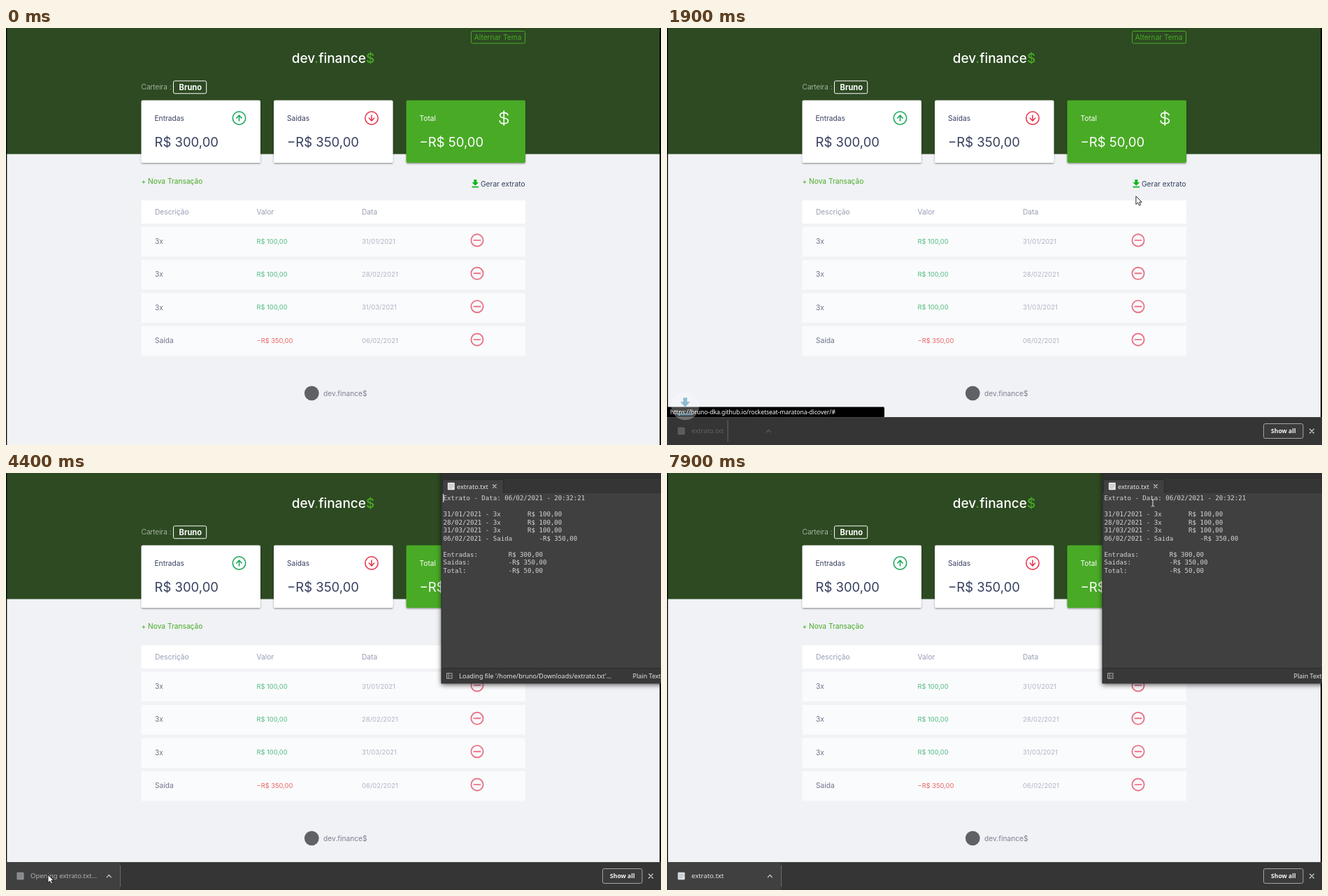
An HTML page for the animation above (8 s loop, 937 by 597 pixels).

```html
<!DOCTYPE html>
<html lang="pt-BR">
<head>
<meta charset="utf-8">
<title>Finance dashboard</title>
<style>
html, body { margin: 0; width: 100%; height: 100%; overflow: hidden; background: #f0f2f5; }
svg { display: block; width: 937px; height: 597px; }
text { font: 10.2px Inter, sans-serif; fill: #363f5f; white-space: pre; }
.big { font-size: 18.5px; }
.num { font-size: 9.3px; }
.date { font-size: 9.5px; }
.ui { font-family: "Noto Sans", sans-serif; fill: #e6e6e6; }
.mono { font: 9.1px "DejaVu Sans Mono", monospace; fill: #d6d6d6; }
.line { fill: none; stroke-linecap: round; stroke-linejoin: round; }
</style>
</head>
<body>
<svg id="stage" viewBox="0 0 937 597"></svg>
<script>
const LOOP = 8000, STEP = 100;
const USER = 'bruno';
const stage = document.getElementById('stage');

const text = (x, y, str, fill = '', cls = '', css = '', id = '') =>
  `<text ${id && `id="${id}"`} x="${x}" y="${y}" class="${cls}" style="${fill && `fill:${fill};`}${css}">${str}</text>`;
const rect = (x, y, w, h, fill, more = '') =>
  `<rect x="${x}" y="${y}" width="${w}" height="${h}" fill="${fill}" ${more}/>`;
const line = (d, color, width = 1, more = '') =>
  `<path class="line" d="${d}" stroke="${color}" stroke-width="${width}" ${more}/>`;
const ring = (x, y, r, color, width) =>
  `<circle cx="${x}" cy="${y}" r="${r}" fill="none" stroke="${color}" stroke-width="${width}"/>`;
const group = (id, body, more = '') => `<g id="${id}" ${more}>${body}</g>`;

function card(x, label, value, fill, ink, icon) {
  return rect(x, 103.6, 170.5, 89.4, fill, 'rx="2" filter="url(#soft)"') +
    text(x + 19, 132.7, label, ink) + text(x + 19, 170, value, ink, 'big') + icon;
}

function arrowIcon(x, dir, color) {
  return ring(x, 129, 9.2, color, 1.5) +
    line(`M${x} ${129 + 4 * dir}V${129 - 4 * dir}M${x - 3.7} 129L${x} ${129 - 4 * dir}L${x + 3.7} 129`, color, 1.5);
}

function row(i, [name, value, date]) {
  const y = 284.7 + i * 47.4;
  const ink = value[0] === '−' ? '#e92929' : '#12a454';
  return group('row' + i,
    rect(193.5, y, 549.5, 42.6, '#fff') +
    text(213, y + 24.1, name) +
    text(358.5, y + 23.9, value, ink, 'num') +
    text(509, y + 23.9, date, '#969cb3', 'date') +
    ring(674, y + 19.2, 8.6, '#e83f5b', 1.9) +
    line(`M669.5 ${y + 19.2}h9`, '#e83f5b', 1.9), 'opacity=".7"');
}

function page() {
  const dollar = line('M712.3 118.8V139.2M718 124.6C717.6 122.4 715.4 121.4 712.3 121.4C709 121.4 706.7 122.8 706.7 125.1' +
    'C706.7 131 718.4 127 718.4 132.8C718.4 135.5 715.8 136.8 712.3 136.8C709 136.8 706.6 135.4 706.2 132.8', '#fff', 1.6);
  const rows = [
    ['3x', 'R$ 100,00', '31/01/2021'],
    ['3x', 'R$ 100,00', '28/02/2021'],
    ['3x', 'R$ 100,00', '31/03/2021'],
    ['Saída', '−R$ 350,00', '06/02/2021']
  ];
  return rect(0, 0, 937, 597, '#f0f2f5') + rect(0, 0, 937, 180.5, '#2d4a22') +
    rect(665.5, 4.5, 77, 17.5, 'none', 'rx="2" stroke="#49aa26"') +
    text(669.8, 17, 'Alternar Tema', '#49aa26') +
    text(408.7, 50.3, 'dev<tspan fill="#49aa26">.</tspan>finance<tspan fill="#49aa26">$</tspan>', '#fff', '', 'font-size:19px;font-weight:500') +
    text(193.5, 88.3, 'Carteira :', '#c3ccc0', '', 'font-weight:300') +
    rect(239.5, 75.8, 47.2, 18, 'none', 'rx="2" stroke="#fff"') +
    text(247.6, 88.8, 'Bruno', '#fff', '', 'font-size:11.1px;font-weight:700') +
    card(193.5, 'Entradas', 'R$ 300,00', '#fff', '#363f5f', arrowIcon(333.5, 1, '#12a454')) +
    card(383, 'Saídas', '−R$ 350,00', '#fff', '#363f5f', arrowIcon(523, -1, '#e92f48')) +
    card(572.5, 'Total', '−R$ 50,00', '#49aa26', '#fff', dollar) +
    text(193.5, 222.6, '+ Nova Transação', '#49aa26') +
    '<path id="get" d="M669.3 217h4v4h2.8l-4.8 4.7l-4.8-4.7h2.8zM666.5 226.7h9.6v1.7h-9.6z"/>' +
    text(679, 226.8, 'Gerar extrato', '', '', '', 'link') +
    rect(193.5, 246.7, 549.5, 33.3, '#fff') +
    text(213, 266.6, 'Descrição', '#969cb3') + text(358.5, 266.6, 'Valor', '#969cb3') + text(509, 266.6, 'Data', '#969cb3') +
    rows.map((r, i) => row(i, r)).join('') +
    '<circle cx="437.3" cy="522.8" r="10.4" fill="#5f6166"/>' +
    text(454, 526.6, 'dev.finance$', '#7d8191') +
    rect(0, 0, 1.3, 597, '#000') + rect(935, 0, 2, 597, '#000');
}

const docIcon = (x, y, fill) => rect(x, y, 10, 10.5, fill, 'rx="1"') +
  line(`M${x + 2} ${y + 3}h6m-6 2.3h6m-6 2.3h4`, '#9aa0a6', .7);

function shelf() {
  const item = rect(1, 557.5, 162, 39.5, '#404040', 'id="lit"') +
    group('doc', docIcon(15.5, 571.8, '#dfe3e8')) +
    text(35, 580.3, '', '', 'ui', 'font-size:9.5px', 'file') +
    group('caret', line('M142.2 578.8l3.1-3.3l3.1 3.3', '#ccc', 1.2));
  return group('status', rect(0, 542.6, 311, 14.6, '#000', 'rx="1.5"') +
      text(4.8, 552.9, `https://${USER}-dka.github.io/rocketseat-maratona-dicover/#`, '#fff', 'ui', 'font-size:8.5px', 'url')) +
    group('bar', rect(0, 557, 937, 40, '#353535') + rect(0, 557, 937, 1, '#434343')) +
    group('item', item) +
    group('sep', line('M0 562V592', '#6a6a6a')) +
    group('all', rect(853.5, 566.5, 56.5, 21, '#3b3b3b', 'rx="2.5" stroke="#a5a5a5"') +
      text(864, 580.4, 'Show all', '#f4f4f4', 'ui', 'font-size:8.6px;font-weight:700')) +
    group('close', line('M919.5 574.2l5.8 5.8m0-5.8l-5.8 5.8', '#ddd', 1.2)) +
    group('drop', '<circle r="20" fill="#fff" opacity=".35"/>' +
      '<path d="M-2.8-12h5.6v6h4.2l-7 7.5l-7-7.5h4.2zM-10.5 10.6h21v2.4h-21z" fill="#7fb2d0"/>');
}

function editor() {
  const pad = (a, col, b) => a.padEnd(col) + b;
  const lines = [
    'Extrato - Data: 06/02/2021 - 20:32:21', '',
    pad('31/01/2021 - 3x', 22, 'R$ 100,00'),
    pad('28/02/2021 - 3x', 22, 'R$ 100,00'),
    pad('31/03/2021 - 3x', 22, 'R$ 100,00'),
    pad('06/02/2021 - Saida', 25, '-R$ 350,00'), '',
    pad('Entradas:', 17, 'R$ 300,00'),
    pad('Saídas:', 17, '-R$ 350,00'),
    pad('Total:', 17, '-R$ 50,00')
  ];
  return rect(622.5, -8, 330, 309.5, '#2b2b2b', 'filter="url(#deep)"') +
    rect(623.5, 0, 314, 7.5, '#303030') + rect(623.5, 8, 314, 21, '#353535') +
    rect(624.5, 9, 87.5, 21, '#404040') +
    line('M624.5 29V9.5H711.8V29', '#292929') +
    rect(623.5, 29, 314, 250, '#404040') +
    rect(623.5, 279, 314, 22, '#383838') + rect(623.5, 279, 314, 1, '#2b2b2b') +
    docIcon(631.8, 13.8, '#e6e6e6') +
    text(645, 22.6, 'extrato.txt', '', 'ui', 'font-size:9.2px') +
    line('M696.6 16.8l4.6 4.6m0-4.6l-4.6 4.6', '#c4c4c4', 1.3) +
    lines.map((s, i) => text(625.6, 39 + i * 11.52, s, '', 'mono')).join('') +
    rect(630.5, 286.8, 7.5, 7.2, 'none', 'stroke="#b5b5b5" stroke-width=".9"') +
    line('M633 287V294M634.7 290.4h1.6', '#b5b5b5', .9) +
    group('loading', text(648.3, 293.7, `Loading file '/home/${USER}/Downloads/extrato.txt'…`, '', 'ui', 'font-size:9px')) +
    text(896.5, 293.7, 'Plain Text', '', 'ui', 'font-size:9px') +
    group('blink', rect(625.2, 30, 1, 12, '#f2f2f2'));
}

const pointers =
  '<path id="arrow" d="M0 0V11.6L2.7 9.2L4.6 13.2L6.6 12.3L4.8 8.4H8.3Z" fill="#fff" stroke="#111" stroke-width=".9"/>' +
  '<path id="hand" d="M-1.9 5.8V-.6C-1.9-2.2.4-2.2.4-.6V3.2L5.3 4C6.6 4.3 7 5 6.9 6.2L6.3 10.6H-.7L-4 6.4C-4.7 5.3-3.4 4.5-2.7 5.1Z" fill="#fff" stroke="#111" stroke-width="1"/>' +
  '<path id="beam" class="line" d="M-2-5C-.8-5 0-4.6 0-4V4.4C0 5-.8 5.3-2 5.3M2-5C.8-5 0-4.6 0-4M0 4.4C0 5 .8 5.3 2 5.3" stroke="#e8e8e8"/>';

stage.innerHTML = `<defs>
  <filter id="soft" x="-10%" y="-10%" width="120%" height="125%"><feDropShadow dx="0" dy="1.3" stdDeviation="1.2" flood-opacity=".4"/></filter>
  <filter id="deep" x="-10%" y="-10%" width="120%" height="120%"><feDropShadow dx="0" dy="2" stdDeviation="3.5" flood-opacity=".6"/></filter>
</defs>` + page() + group('shelf', shelf()) + group('editor', editor()) + group('pointer', pointers);

const el = {};
stage.querySelectorAll('[id]').forEach(n => el[n.id] = n);

const show = (id, on) => el[id].setAttribute('display', on ? 'inline' : 'none');
const move = (id, x, y) => el[id].setAttribute('transform', `translate(${x} ${y})`);
const fade = (id, a) => el[id].setAttribute('opacity', a);
const span = (t, a, b) => Math.min(1, Math.max(0, (t - a) / (b - a)));
const smooth = p => p * p * (3 - 2 * p);
const within = (t, a, b) => t >= a && t < b;

// Pointer track: time, x, y
const track = [
  [200, 896, 540], [500, 800, 370], [800, 706, 222], [1000, 702, 226], [1700, 702, 226],
  [2000, 660, 246], [2400, 557, 307], [2600, 557, 307], [3000, 330, 430], [3500, 60, 575],
  [4600, 60, 575], [4900, 480, 470], [5200, 940, 330],
  [6400, 940, 330], [6700, 850, 190], [7000, 745, 60], [7300, 690, 38], [7900, 695, 42.5]
];

function pointerAt(t) {
  const i = Math.max(1, track.findIndex(k => k[0] >= t));
  const [a, b] = [track[i - 1], track[i]];
  const p = smooth(span(t, a[0], b[0]));
  return [a[1] + (b[1] - a[1]) * p, a[2] + (b[2] - a[2]) * p];
}

function render(t) {
  const [x, y] = pointerAt(t);
  const onLink = within(t, 800, 1900);
  const open = t >= 4400;
  const inText = open && x > 624 && y > 29 && y < 279;
  show('pointer', within(t, 200, 5200) || t >= 6500);
  move('pointer', x, y);
  show('hand', onLink);
  show('beam', inText);
  show('arrow', !onLink && !inText);
  el.link.style.fill = onLink ? '#626a86' : '#363f5f';
  el.get.setAttribute('fill', onLink ? '#12e42a' : '#12b51f');

  // Shelf slides up; its children trail it
  const off = t < 1700 ? 40 : 25.5 * (1 - span(t, 1700, 1900)) ** 2;
  const shelfOn = t >= 1700;
  ['bar', 'item', 'sep', 'all', 'close'].forEach(id => show(id, shelfOn));
  move('bar', 0, off);
  move('all', 0, off * .69);
  move('close', 0, off * .54);
  const grow = smooth(span(t, 1700, 2100));
  const hovered = t >= 3300;
  move('sep', hovered ? 163.5 : 12.5 + 149 * grow, off);
  move('caret', hovered ? 2 : 0, 0);
  move('item', 0, off);
  fade('item', span(t, 1800, 2200));
  show('lit', hovered);

  const opening = within(t, 3600, 6900);
  el.file.textContent = opening ? 'Opening extrato.txt…' : 'extrato.txt';
  el.file.style.fill = opening ? '#b2b2b2' : '#e6e6e6';
  fade('doc', opening ? .5 : 1);

  show('status', within(t, 1000, 2800));
  move('status', 0, off);
  fade('status', t >= 2700 ? .5 : 1);
  fade('url', t < 1100 ? .5 : 1);

  const fall = span(t, 1670, 2420);
  show('drop', fall > 0 && fall < 1);
  move('drop', 26, 526 + 50 * fall);
  fade('drop', 4 * fall * (1 - fall));

  show('editor', open);
  show('loading', t < 6900);
  show('blink', within(t, 4400, 4700) || within(t, 5000, 5800) || within(t, 6100, 7000) || within(t, 7300, 7900));
}

function tick() {
  const t = performance.now() % LOOP;
  render(Math.floor(t / STEP) * STEP);
  requestAnimationFrame(tick);
}
tick();
</script>
</body>
</html>
```
